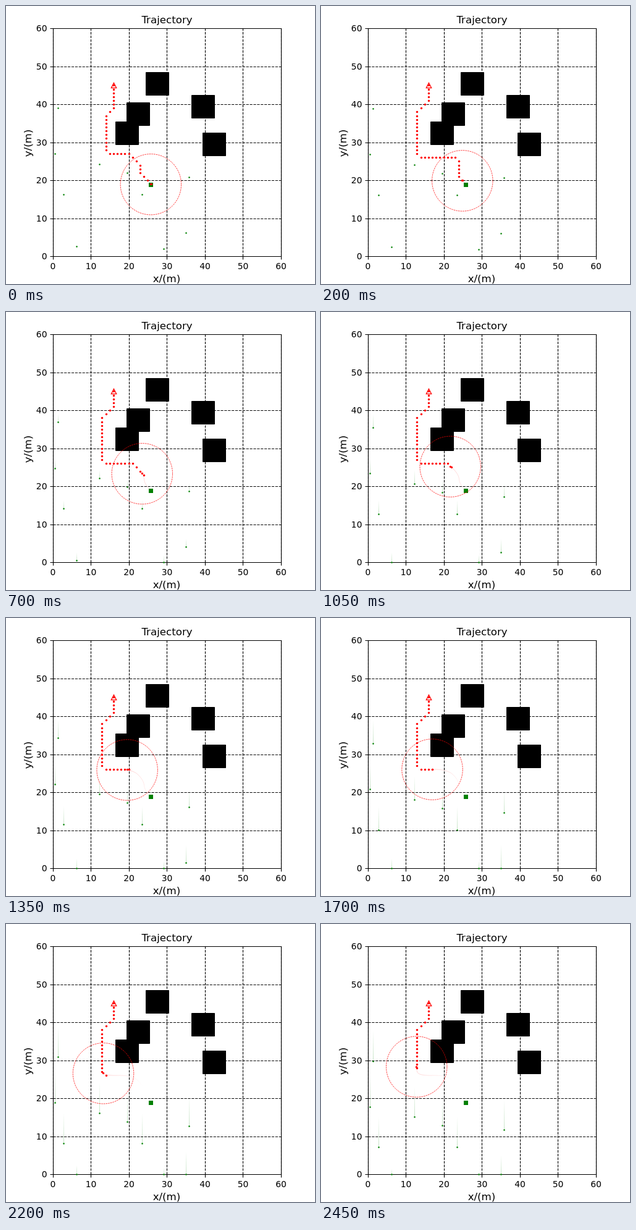
Write an HTML page that moves like this. It is 500 px wide and 450 px high and loops after 2500 ms.

```html
<!DOCTYPE html>
<html>
<head>
<meta charset="utf-8">
<style>
  html, body { margin: 0; width: 100%; height: 100%; overflow: hidden; background: #fff; }
  svg { display: block; font-family: "DejaVu Sans", sans-serif; font-size: 13.89px; }
  .title { font-size: 16.67px; text-anchor: middle; }
  .line { stroke: #000; stroke-width: 1.1; fill: none; }
  .grid { stroke-dasharray: 4.11 1.78; }
</style>
</head>
<body>
<svg width="500" height="450" viewBox="0 0 500 450">
  <defs>
    <linearGradient id="fade" x1="0" y1="0" x2="0" y2="1">
      <stop offset="0" stop-color="green" stop-opacity="0"/>
      <stop offset="1" stop-color="green" stop-opacity=".4"/>
    </linearGradient>
    <path id="route"/>
  </defs>
  <g id="back"></g>
  <g id="scene"></g>
</svg>
<script>
const STEP = 50, LOOP = 2500, SCALE = 6.15;
const ROBOT_SPEED = 0.375, FALL_SPEED = 0.2, TRAIL = 30;  // plot units and steps
const px = x => 76 + SCALE * x;
const py = y => 405.6 - SCALE * y;
const crisp = v => Math.floor(v) + 0.5;
const byId = id => document.getElementById(id);
const dot = (x, y, r, color) =>
  `<circle cx="${crisp(px(x))}" cy="${crisp(py(y))}" r="${r}" fill="${color}"/>`;

// Every lattice cell along straight or diagonal runs between corners
function trace(...corners) {
  const cells = [corners[0]];
  for (const [cx, cy] of corners.slice(1)) {
    let [x, y] = cells[cells.length - 1];
    while (x !== cx || y !== cy) {
      x += Math.sign(cx - x);
      y += Math.sign(cy - y);
      cells.push([x, y]);
    }
  }
  return cells;
}

// The planner changes its mind twice, then sticks to the last plan
const goal = [16, 45];
const replan = turn =>
  trace([25, 20], [24, 21], [24, turn], [47 - turn - (turn === 23 ? 3 : -1), 26], [14, 26], [13, 27], [13, 38], [16, 41], goal);
const firstPlan = trace([26, 19], [23, 22], [23, 24], [20, 27], [15, 27], [14, 28], [14, 37], [16, 39], goal);
const straightFirst = replan(25), diagonalFirst = replan(23);
const planAt = t => t < 100 ? firstPlan : t < 450 ? straightFirst : diagonalFirst;

// The robot keeps a constant speed on a curve smoothed through edge midpoints
const guides = [[25.75, 19], [24.1, 20.5], [23.9, 23.2], [20.9, 26.2], [13, 26], [12.8, 28.4]];
const route = byId('route');
route.setAttribute('d', 'M' + guides[0] + guides.slice(1, -1).map(([x, y], i) => {
  const [nx, ny] = guides[i + 2];
  return `Q${x} ${y} ${(x + nx) / 2} ${(y + ny) / 2}`;
}).join('') + 'L' + guides[guides.length - 1]);

const robotAt = step => route.getPointAtLength(Math.max(0, step - 0.5) * ROBOT_SPEED);

const movers = [[1.35, 39.05], [0.5, 27], [12.25, 24.3], [2.8, 16.35], [19.55, 22],
  [23.45, 16.35], [35.85, 20.85], [35, 6.25], [6.25, 2.65], [29.2, 2]];

function drawMovers(step) {
  const fall = Math.max(0, step - 3) * FALL_SPEED;
  return movers.map(([x, y]) => {
    const head = Math.max(0, y - fall), top = py(Math.min(y, y - fall + 8));
    const height = Math.max(0, py(head) - top);
    return `<rect x="${crisp(px(x)) - 0.3}" y="${top}" width=".6" height="${height}" fill="url(#fade)"/>`
      + dot(x, head, 1.25, 'green');
  }).join('');
}

function drawRobot(step) {
  const { x, y } = robotAt(step);
  let out = '';
  for (let age = 0; age < Math.min(TRAIL, step); age++) {
    const a = robotAt(step - age), b = robotAt(step - age - 1);
    out += `<path d="M${px(a.x)} ${py(a.y)}L${px(b.x)} ${py(b.y)}" stroke="red" stroke-width=".6" opacity="${0.3 * (1 - age / TRAIL)}"/>`;
  }
  out += `<circle r="${8 * SCALE}" transform="translate(${px(x)} ${py(y)}) scale(1 -1)" fill="none" stroke="red" stroke-width=".75" stroke-dasharray="2.57 1.11"/>`;

  const cells = planAt(step * STEP);
  const reached = ([fx, fy], [tx, ty]) => (x - tx) * (tx - fx) + (y - ty) * (ty - fy) >= -0.1;
  let start = 0;
  while (start < cells.length - 1 && reached(cells[start], cells[start + 1])) start++;
  return out + [...cells.slice(start), [x, y]].map(([cx, cy]) => dot(cx, cy, 1.7, 'red')).join('');
}

function drawBack() {
  const left = crisp(px(0)), right = crisp(px(60)), top = crisp(py(60)), bottom = crisp(py(0));
  let out = '';
  for (const [x, y] of [[27.5, 45.5], [22.5, 37.5], [19.5, 32.5], [39.5, 39.5], [42.5, 29.5]])
    out += `<path stroke="#000" d="M${crisp(px(x - 3))} ${crisp(py(y + 3))}H${crisp(px(x + 3))}V${crisp(py(y - 3))}H${crisp(px(x - 3))}Z"/>`;
  for (let v = 0; v <= 60; v += 10) {
    const x = crisp(px(v)), y = crisp(py(v));
    out += `<path class="line grid" d="M${x} ${bottom}V${top}M${left} ${y}H${right}"/>
      <path class="line" d="M${x} ${bottom}v5M${left} ${y}h-5"/>
      <text x="${px(v)}" y="426" text-anchor="middle">${v}</text>
      <text x="66.5" y="${y + 4.5}" text-anchor="end">${v}</text>`;
  }
  return out + `<path class="line" d="M${left} ${top}H${right}V${bottom}H${left}Z"/>
    <text class="title" x="260.5" y="28">Trajectory</text>
    <text class="title" x="260" y="447">x/(m)</text>
    <text class="title" transform="translate(41 222) rotate(-90)">y/(m)</text>
    <rect x="231" y="286" width="7" height="7" fill="green"/>
    <path d="M174.5 124.5l4.2 8.2h-8.4z" fill="none" stroke="red" stroke-width="1.3"/>`;
}

byId('back').innerHTML = drawBack();
const scene = byId('scene');
const began = performance.now();
let shown = -1;

function render() {
  const step = Math.floor((performance.now() - began) % LOOP / STEP);
  if (step !== shown) {
    scene.innerHTML = drawMovers(step) + drawRobot(step);
    shown = step;
  }
  requestAnimationFrame(render);
}
render();
</script>
</body>
</html>
```
